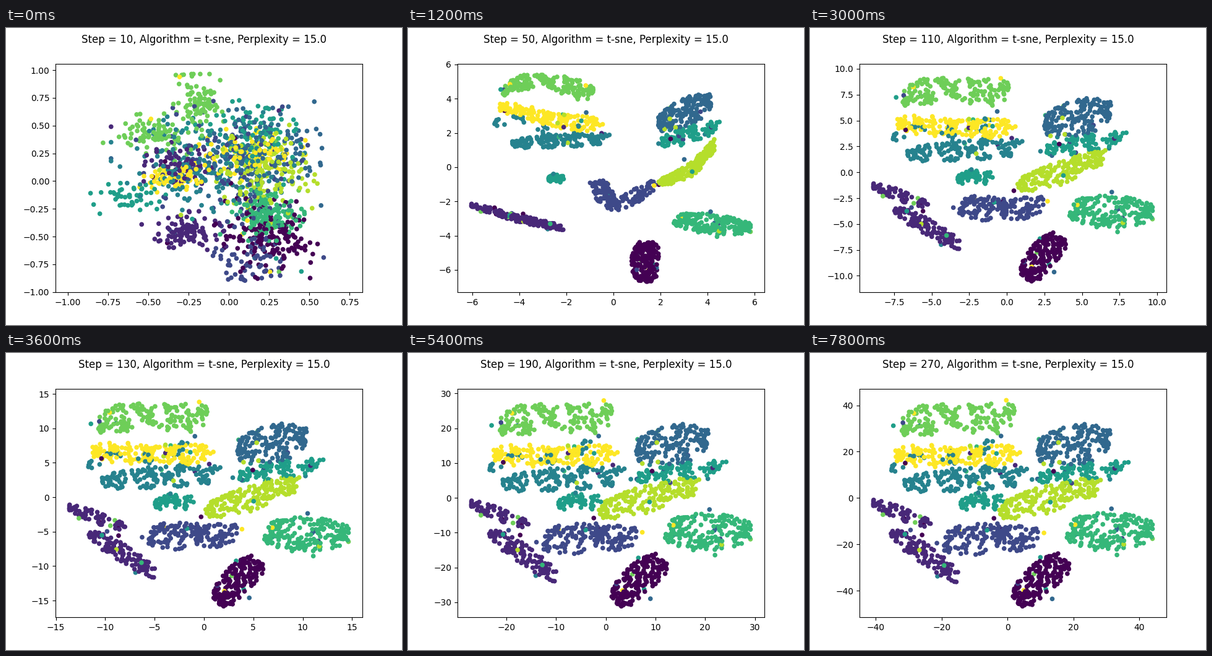
A matplotlib script for the animation above (8000 ms loop, 640 px wide and 480 px high).

```python
import numpy as np
import matplotlib.pyplot as plt
from matplotlib.animation import FuncAnimation

INTERVAL, FRAMES, FRAMES_PER_STEP = 100, 80, 3
LEFT, RIGHT, TOP, BOTTOM = 80, 576, 57.6, 427.2  # plot area in pixels from the top left
CHAIN, SPACING = 4, 6  # neighbouring samples form short strings of dots
STRAY_SHARE = .04
rng = np.random.default_rng(4)

labels, mixed, tight, settled = [], [], [], []


def band(u, v, x0, y0, x1, y1, width, bend=0):
    """Map u along and v across a rounded, optionally bowed band."""
    start, along = np.array([x0, y0]), np.array([x1 - x0, y1 - y0])
    normal = np.array([-along[1], along[0]]) / np.hypot(*along)
    taper = np.sqrt(1 - .8 * (2 * u - 1) ** 2)
    across = v * width * taper + bend * 4 * u * (1 - u)
    return start + np.outer(u, along) + np.outer(across, normal)


def reflect(a):
    return 1 - np.abs(1 - np.abs(a))


def cluster(label, n, cloud, tight_band, settled_band):
    """Add one cluster: a noisy cloud that condenses to a band and spreads out."""
    x0, y0, x1, y1, width = settled_band
    anchor, link = np.divmod(np.arange(n), CHAIN)
    angle = rng.uniform(0, 2 * np.pi, anchor[-1] + 1)[anchor] + rng.normal(0, .4, n)
    reach = link * SPACING
    u = (.5 + anchor * .7549) % 1 + reach * np.cos(angle) / np.hypot(x1 - x0, y1 - y0)
    v = (.5 + anchor * .5698) % 1 + reach * np.sin(angle) / (2 * width)
    u, v = reflect(u), 2 * reflect(v) - 1

    stray = rng.random(n) < STRAY_SHARE
    drift = stray[:, None] * rng.normal(0, 12, (n, 2))
    labels.append(np.where(stray, rng.integers(0, 10, n), label))
    noise = np.clip(rng.normal(size=(n, 2)), -2.6, 2.6)
    mixed.append(np.array(cloud[:2]) + noise * cloud[2:])
    tight.append(band(u, v, *tight_band) + drift / 2)
    settled.append(band(u, v, *settled_band) + drift)


# label, count, cloud (centre, spread), tight band, settled band (ends, half width)
cluster(0, 178, (425, 338, 34, 26), (382, 410, 388, 345, 24), (333, 402, 414, 333, 27))
cluster(1, 66, (275, 217, 26, 17), (102, 286, 185, 310, 5), (101, 241, 200, 282, 11))
cluster(1, 112, (290, 330, 28, 13), (150, 302, 253, 324, 6), (133, 288, 242, 366, 16))
cluster(2, 100, (365, 225, 65, 55), (304, 248, 332, 292, 15), (215, 308, 325, 292, 26))
cluster(2, 66, (395, 370, 30, 22), (335, 290, 408, 250, 12), (300, 300, 376, 302, 23))
cluster(3, 165, (415, 200, 42, 36), (405, 158, 492, 115, 22), (368, 160, 488, 138, 33))
cluster(4, 150, (305, 218, 52, 34), (168, 187, 328, 178, 11), (152, 212, 354, 197, 20))
cluster(4, 32, (380, 235, 50, 36), (140, 150, 310, 175, 16), (130, 185, 332, 145, 17))
cluster(5, 95, (405, 178, 38, 30), (410, 185, 510, 157, 14), (370, 202, 523, 183, 15))
cluster(5, 50, (200, 274, 30, 14), (227, 243, 252, 244, 7), (243, 243, 315, 240, 15))
cluster(6, 178, (420, 297, 24, 18), (430, 310, 555, 325, 16), (415, 288, 556, 290, 31))
cluster(7, 85, (230, 172, 30, 14), (152, 104, 235, 86, 12, -8), (146, 120, 235, 97, 25))
cluster(7, 90, (312, 120, 16, 26), (228, 88, 307, 117, 16, -6), (228, 105, 348, 105, 26))
cluster(8, 165, (420, 232, 32, 32), (405, 250, 497, 182, 10, 14), (305, 258, 472, 212, 23))
cluster(9, 80, (270, 243, 26, 10), (148, 127, 240, 150, 13), (138, 165, 245, 170, 21))
cluster(9, 90, (385, 207, 38, 19), (215, 147, 322, 160, 14), (230, 168, 348, 165, 18))

order = rng.permutation(sum(map(len, labels)))
labels = np.concatenate(labels)[order]
mixed, tight, settled = (
    np.clip(np.concatenate(part)[order], (102.5, 74.4), (553.5, 410.4))
    for part in (mixed, tight, settled))

# Axis limits at a few steps: x from, x to, y from, y to
LIMITS = {
    10: (-1.077, .829, -1.002, 1.058),
    50: (-6.63, 6.42, -7.31, 6.05),
    110: (-9.81, 10.62, -11.6, 10.5),
    150: (-20.262, 21.458, -23.27, 21.01),
    190: (-29.84, 31.93, -34.33, 31.4),
    230: (-38.1, 40.8, -43.5, 39.5),
    270: (-44.98, 48.27, -51.54, 47.2),
}


def late_rise(step):
    """Nearly still until the exaggeration ends, then a quick release."""
    return np.clip((step - 50) / 60, 0, 1) ** 6


def limits(step):
    if 50 < step < 110:
        step = 50 + 60 * late_rise(step)
    return [np.interp(step, list(LIMITS), edge) for edge in zip(*LIMITS.values())]


def positions(step):
    gather = np.clip((step - 10) / 40, 0, 1)
    gather = gather * (2 - gather)
    relax = 1 - np.exp(-max(step - 110, 0) / 35)
    spread = .7 * late_rise(step) + .3 * relax
    target = tight + spread * (settled - tight)
    return mixed + gather * (target - mixed)


fig, ax = plt.subplots(figsize=(6.4, 4.8), dpi=100)
dots = ax.scatter(*mixed.T, c=labels, s=20, cmap="viridis")
title = fig.suptitle("")


def update(frame):
    step = 10 + 10 * (frame // FRAMES_PER_STEP)
    x0, x1, y0, y1 = limits(step)
    ax.set_xlim(x0, x1)
    ax.set_ylim(y0, y1)
    px, py = positions(step).T
    dots.set_offsets(np.column_stack([
        x0 + (px - LEFT) / (RIGHT - LEFT) * (x1 - x0),
        y0 + (BOTTOM - py) / (BOTTOM - TOP) * (y1 - y0)]))
    title.set_text(f"Step = {step}, Algorithm = t-sne, Perplexity = 15.0")
    return dots, title


anim = FuncAnimation(fig, update, frames=FRAMES, interval=INTERVAL, repeat=True, repeat_delay=0)
plt.show()
```
